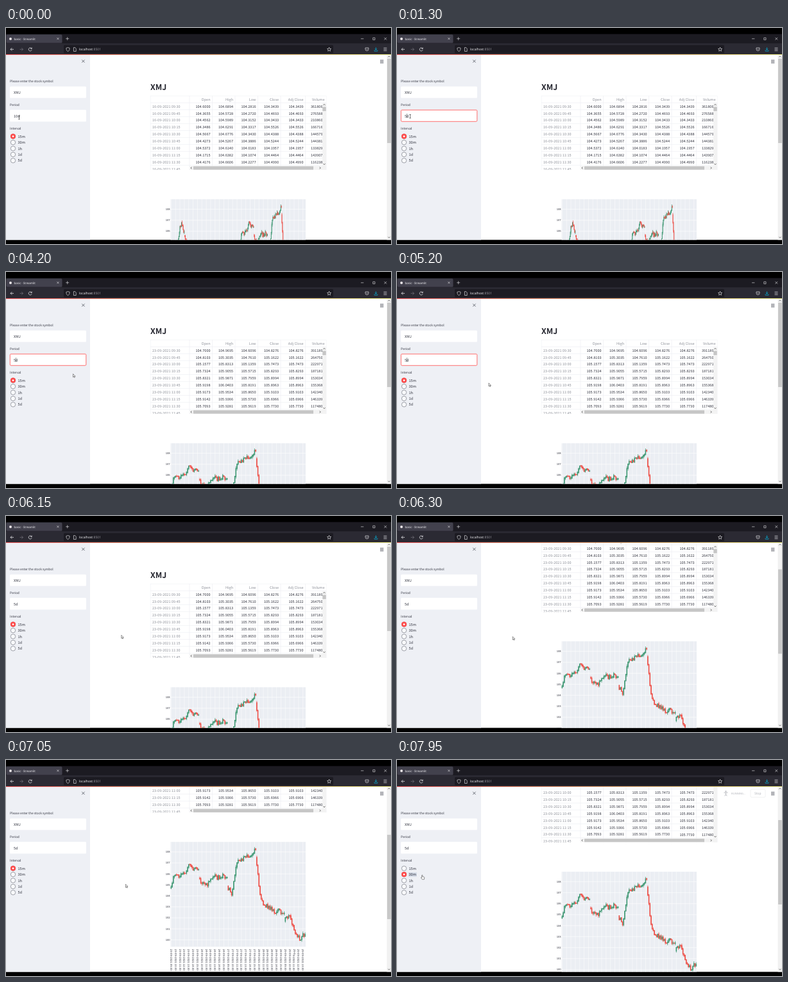
Write an HTML page that moves like this. It is 600 px wide and 338 px high and loops after 8000 ms.

```html
<!DOCTYPE html>
<html lang="en">
<head>
<meta charset="utf-8">
<title>basic · Streamlit</title>
<style>
html, body { margin: 0; width: 100%; height: 100%; overflow: hidden; background: #000; }
svg { display: block; width: 100vw; height: 100vh; }
/* The tiny turn keeps small glyphs from being snapped to whole pixels. */
text {
  font-family: "Noto Sans CJK JP", "Noto Sans CJK SC", "Noto Sans CJK", "Open Sans", sans-serif;
  text-rendering: geometricPrecision; white-space: pre; rotate: .01deg;
}
.ui { font-family: "Open Sans", "Noto Sans", sans-serif; }
</style>
</head>
<body>
<svg id="stage" viewBox="0 0 600 338"></svg>
<script>
const LOOP = 8000, SYMBOL = "XMJ", INK = "#31333f", RED = "#ff4b4b";
const stage = document.getElementById("stage");

function el(parent, name, attrs = {}, content) {
  const node = document.createElementNS("http://www.w3.org/2000/svg", name);
  for (const key in attrs) node.setAttribute(key, attrs[key]);
  if (content !== undefined) node.textContent = content;
  parent.appendChild(node);
  return node;
}
const group = (parent, attrs) => el(parent, "g", attrs);
const rect = (parent, x, y, width, height, fill, more) =>
  el(parent, "rect", { x, y, width, height, fill, ...more });
const circle = (parent, cx, cy, r, fill, more) => el(parent, "circle", { cx, cy, r, fill, ...more });
const line = (parent, d, stroke, width, more) =>
  el(parent, "path", { d, stroke, "stroke-width": width, fill: "none", ...more });
const shape = (parent, d, fill, more) => el(parent, "path", { d, fill, ...more });
const text = (parent, x, y, str, size, fill = INK, more) =>
  el(parent, "text", { x, y, "font-size": size, fill, ...more }, str);
const END = { "text-anchor": "end" };
function clip(id, x, y, width, height) {
  rect(el(stage, "clipPath", { id }), x, y, width, height);
  return { "clip-path": `url(#${id})` };
}
const show = (node, on) => node.setAttribute("display", on ? "inline" : "none");
const clamp = v => Math.max(0, Math.min(1, v));
const mix = (a, b, k) => a + (b - a) * k;
const ramp = (t, start, length) => clamp((t - start) / length);
function clock(bar) {
  const minutes = 570 + bar * 15;
  return String(Math.floor(minutes / 60)).padStart(2, "0") + ":" + String(minutes % 60).padStart(2, "0");
}

// Browser window
function drawBrowser() {
  const g = group(stage), pale = "#fbfbfe";
  rect(g, 0, 0, 600, 338, "#000");
  rect(g, 0, 9.5, 600, 15, "#1c1b22");
  rect(g, .5, 10.3, 87, 13.2, "#42414d", { rx: 1.6 });
  circle(g, 7, 17, 2, "#ebe6e8");
  text(g, 12.5, 18.6, "basic · Streamlit", 4.55, pale, { class: "ui" });
  line(g, "M79.4 15.2l3 3m0-3l-3 3M93.2 16.7h5m-2.5-2.5v5", pale, .55);
  line(g, "M553 16.8h4.4M589.4 14.9l3.8 3.8m0-3.8l-3.8 3.8M571.8 15.3h3.2v3.2h-3.2z", pale, .55);
  rect(g, 0, 24, 600, 18, "#2b2a33");
  rect(g, 90, 26.8, 420, 12.8, "#1c1b22", { rx: 1.6 });
  line(g, "M12 33.4H7m2.3-2.3L7 33.4l2.3 2.3", pale, .7);
  line(g, "M21.6 33.4h5m-2.3-2.3l2.3 2.3l-2.3 2.3", "#77767e", .7);
  line(g, "M39.8 32a2.5 2.5 0 1 0 .3 2.3M40.2 30.6v1.9h-1.9", pale, .7);
  line(g, "M96.5 30.5l2.6 .9c0 2.6-.6 4.2-2.6 5.3c-2-1.1-2.6-2.7-2.6-5.3z", pale, .6);
  line(g, "M105.4 30.6h2.3l1.5 1.6v4.3h-3.8z", pale, .6);
  const url = text(g, 114, 35.3, "", 5.05, pale, { class: "ui" });
  el(url, "tspan", {}, "localhost");
  el(url, "tspan", { fill: "#9b9aa2" }, ":8501");
  line(g, "M503.6 30.3l.9 2 2.1.2-1.6 1.5.5 2.2-1.9-1.1-1.9 1.1.5-2.2-1.6-1.5 2.1-.2z", pale, .6);
  line(g, "M560 31h5v2.2a2.5 2.5 0 0 1-5 0zM561.3 32.7l1.2 1.2 1.2-1.2", pale, .6);
  line(g, "M576.5 30.4v3.8m-1.7-1.6l1.7 1.7 1.7-1.7M574 34.8v1.3h5v-1.3", "#00b7e0", .75);
  line(g, "M588.5 31.2h5m-5 2.2h5m-5 2.2h5", pale, .6);
}

// Prices: a few evenly spaced levels shape each trading day, a seeded jitter makes its bars
const EARLIER = [
  [104.6, 104.4, 104.4, 104.5, 106.2, 106.7, 105.9],
  [105.6, 104, 103], [102.5, 102.8], [103, 103.6], [103.6, 104.2]
];
const RECENT = [
  [104.7, 106.1, 105.8, 106, 106.75, 106.5, 106.3],
  [105.6, 105, 105.1, 105.75, 105.65, 105.8, 105.75],
  [104.9, 104.1, 107.2, 107.3, 107.5, 107.75, 108.2],
  [107.5, 103.8, 103.1, 102.9, 102.5, 102.7, 102.3],
  [101.7, 102.4, 100.7, 100.1, 100.6]
];
const DAY_BARS = 26, LAST_BARS = 19;

let seed = 11;
const random = () => (seed = seed * 16807 % 2147483647) / 2147483647;

function makeDay(levels, bars) {
  let open = levels[0];
  return Array.from({ length: bars }, (_, k) => {
    const place = (k + 1) / bars * (levels.length - 1);
    const i = Math.min(Math.floor(place), levels.length - 2);
    const close = mix(levels[i], levels[i + 1], place - i) + (random() - .5) * .42;
    const bar = {
      open, close,
      high: Math.max(open, close) + random() * .2,
      low: Math.min(open, close) - random() * .2,
      volume: Math.round(1e6 + 2.6e6 * Math.exp(-k / 2) + random() * 4e5)
    };
    open = close + (random() - .5) * .06;
    return bar;
  });
}
const allDays = [...EARLIER, ...RECENT].map((levels, d, list) =>
  makeDay(levels, d < list.length - 1 ? DAY_BARS : LAST_BARS));
const PERIODS = [
  { firstDay: 16, days: allDays },
  { firstDay: 23, days: allDays.slice(EARLIER.length) }
];

// Candlestick chart with its range slider
const WIDTH = 210.5, HEIGHT = 164;
const priceY = price => 15.6 + (108 - price) * 17.2;

function drawCandles(parent, days, scale) {
  const bars = days.flat(), step = WIDTH / bars.length;
  const width = step * .85, bodies = ["", ""], wicks = ["", ""];
  const stroke = (x, a, b) =>
    `M${x.toFixed(2)} ${(priceY(a) * scale).toFixed(2)}V${(priceY(b) * scale + .05).toFixed(2)}`;
  bars.forEach(({ open, high, low, close }, i) => {
    const x = (i + .5) * step, falling = close < open ? 1 : 0;
    bodies[falling] += stroke(x, Math.max(open, close), Math.min(open, close));
    wicks[falling] += stroke(x, high, low);
  });
  ["#35936c", "#ee443b"].forEach((color, i) => {
    line(parent, wicks[i], color, Math.min(.7, width));
    line(parent, bodies[i], color, width, { "stroke-linecap": "square" });
  });
}

function drawChart(page) {
  const g = group(page, { transform: "translate(256.5 268)" });
  const back = "#ebeef3", labels = 31, tick = WIDTH * 4 / (4 * DAY_BARS + LAST_BARS);
  rect(g, 0, 0, WIDTH, HEIGHT, back);
  for (let price = 100; price <= 108; price++) {
    line(g, `M0 ${priceY(price)}H${WIDTH}`, "#fff", .6);
    text(g, -.8, priceY(price) + 1.5, price, 4.2, INK, END);
  }
  for (let i = 0; i < labels; i++) {
    const bar = i * 4, x = (i + .125) * tick, day = Math.floor(bar / DAY_BARS);
    const date = 23 + day + (day > 1 ? 2 : 0);
    line(g, `M${x} 0V${HEIGHT}`, "#fff", .5);
    text(g, 0, 0, `${date}-09-2021 ${clock(bar % DAY_BARS)}`, 4.3, INK,
      { transform: `translate(${x - 1.5} 167.6) rotate(90)` });
  }
  rect(g, 0, 207, WIDTH, 36, back);
  const views = PERIODS.map(({ days }) => {
    const view = group(g);
    drawCandles(view, days, 1);
    drawCandles(group(view, { transform: "translate(0 207)" }), days, 36 / HEIGHT);
    return view;
  });
  for (const x of [-1.2, WIDTH - .9])
    rect(g, x, 216, 2, 17, "#fff", { stroke: "#555", "stroke-width": .4 });
  return views;
}

// Quote table
function drawTable(page) {
  const g = group(page, clip("table", 224.5, 105.5, 275, 116.5));
  const grey = "#8d9099", size = 5.57, pitch = 10.88, rows = 10;
  const edges = [286, 321.5, 357, 392.5, 428, 466.5, 499.5];
  const cell = (parent, c, y, str, fill) => text(parent, edges[c + 1] - 2.9, y, str, size, fill, END);
  let grid = "M225 106H499M225 106V222";
  for (const x of edges) grid += `M${x} 106V222`;
  for (let r = 0; r < rows; r++) grid += `M225 ${117 + r * pitch}H499`;
  line(g, grid, "#e4e6ec", .45);
  ["Open", "High", "Low", "Close", "Adj Close", "Volume"].forEach((name, c) =>
    cell(g, c, 113.6, name, grey));
  const views = PERIODS.map(({ firstDay, days }) => {
    const view = group(g);
    for (let r = 0; r < rows; r++) {
      const { open, high, low, close, volume } = days[0][r], y = 124.6 + r * pitch;
      text(view, 228, y, `${firstDay}-09-2021 ${clock(r)}`, size, grey);
      if (r === rows - 1) continue;
      [open, high, low, close, close].forEach((price, c) => cell(view, c, y, price.toFixed(4)));
      cell(view, 5, y, volume);
    }
    return view;
  });
  rect(g, 493, 117.3, 6, 105, "#f3f3f3");
  rect(g, 286.2, 216, 213, 6, "#f3f3f3");
  rect(g, 493.3, 123.5, 5.4, 6.5, "#c6c6c6");
  rect(g, 292, 216.4, 187, 5.3, "#c6c6c6");
  line(g, "M494.5 120.8l1.5-1.5 1.5 1.5M494.5 212.3l1.5 1.5 1.5-1.5M289.4 217.5l-1.5 1.5 1.5 1.5M488.8 217.5l1.5 1.5-1.5 1.5", "#444", .8);
  return views;
}

function drawSidebar() {
  const g = group(stage);
  rect(g, 0, 42, 131, 289.5, "#eef0f5");
  line(g, "M118.2 49.7l4.4 4.4m0-4.4l-4.4 4.4", "#5d606a", .9);
  text(g, 6, 85.4, "Please enter the stock symbol", 4.9);
  rect(g, 6, 91.5, 119, 18, "#fff", { rx: 1.5 });
  text(g, 12, 102.5, SYMBOL, 5.58);
  text(g, 6, 122.3, "Period", 4.9);
  rect(g, 6, 128, 119, 18.5, "#fff", { rx: 1.5 });
  const focus = rect(g, 6.3, 128.3, 118.5, 18, "none", { rx: 1.5, stroke: RED, "stroke-width": .8 });
  const period = text(g, 12, 139.9, "", 5.58);
  const caret = rect(g, 0, 134, .5, 7, "#222");
  text(g, 6, 158.8, "Interval", 4.9);
  const hover = rect(g, 17.8, 175.8, 13, 6.8, "#d3dae6");
  const dots = ["15m", "30m", "1h", "1d", "5d"].map((name, i) => {
    const cy = 169.6 + i * 9.45;
    circle(g, 11, cy, 3.7, "#f8f9fb", { stroke: "#666873", "stroke-width": .6 });
    text(g, 18.5, cy + 2, name, 5.58);
    const dot = group(g);
    circle(dot, 11, cy, 4, RED);
    circle(dot, 11, cy, 1.4, "#fff");
    return dot;
  });
  return { focus, period, caret, hover, dots };
}

function drawStatus() {
  const g = group(stage), grey = "#a5a7af";
  circle(g, 512.5, 49.1, 1, grey);
  line(g, "M509.5 51h6M512.5 51v2.5l-1.6 2.8M512.5 53.5l1.6 2.8", grey, .9);
  text(g, 521, 54, "RUNNING...", 4.2, grey);
  rect(g, 551, 46, 23, 12.3, "#fff", { rx: 1.5, stroke: "#d5d6da", "stroke-width": .4 });
  text(g, 557, 54.2, "Stop", 4.9, grey);
  return g;
}

function drawPointers() {
  const beam = group(stage), arrow = group(stage), hand = group(stage);
  line(beam, "M-1.3-2.8h2.6M0-2.8v5.6M-1.3 2.8h2.6", "#222", .6);
  const outline = { stroke: "#222", "stroke-width": .5, "stroke-linejoin": "round" };
  shape(arrow, "M0 0v5l1.2-1.1.8 1.8.8-.4-.8-1.7h1.6z", "#fff", outline);
  shape(hand, "M-.6 0q.6-.6 1.2 0v2.3l2.4.6q.6.2.5.9l-.5 2.7h-3l-2-2.6q.3-.8 1.4-.1z", "#fff", outline);
  return { beam, arrow, hand };
}

drawBrowser();
rect(stage, 0, 42, 600, 289.5, "#fff");
const page = group(group(stage, clip("view", 131, 42, 462.5, 289.5)));
text(page, 225, 97.3, SYMBOL, 12.3, "#262730", { "font-weight": 700 });
const tables = drawTable(page), charts = drawChart(page);
const sidebar = drawSidebar();
const status = drawStatus();
line(stage, "M583 50.4h5.4m-5.4 2.1h5.4m-5.4 2.1h5.4", INK, .75);
rect(stage, 593.5, 42, 6.5, 289.5, "#f1f1f1");
const thumb = rect(stage, 594, 48, 5.7, 132, "#c8c8c8");
line(stage, "M595.3 45.6l1.6-1.6 1.6 1.6M595.3 326.8l1.6 1.6 1.6-1.6", "#555", .8);
const accent = el(stage, "linearGradient", { id: "accent" });
el(accent, "stop", { offset: 0, "stop-color": RED });
el(accent, "stop", { offset: 1, "stop-color": "#fffd80" });
rect(stage, 0, 41.2, 600, .9, "url(#accent)");
const pointers = drawPointers();

// Timeline
const NOTCH = 46.6, BLUR = 5400, RERUN = 1600, LOADED = 2000, PICK = 7850;
const STOPS = [
  [0, 20.5, 140], [150, 20.5, 138.2], [2400, 20.5, 138.2], [3800, 101, 155], [4050, 103, 158],
  [4350, 106, 161], [4500, 106, 161], [5900, 179.8, 186.5], [6200, 179.8, 186.5],
  [6500, 181.2, 193], [7050, 186.7, 194.5], [7600, 39.3, 180.3], [LOOP, 39.3, 180.3]
];

function scrollAt(t) {
  const notch = start => 1 - (1 - ramp(t, start, 160)) ** 2;
  let turns = -notch(6840) - notch(7080);
  for (let i = 0; i < 4; i++) turns += notch(6180 + i * 62);
  return turns * NOTCH;
}
function pointerAt(t) {
  const i = STOPS.findIndex(stop => stop[0] > t), [t0, x0, y0] = STOPS[i - 1], [t1, x1, y1] = STOPS[i];
  const k = ramp(t, t0, t1 - t0);
  return [mix(x0, x1, k), mix(y0, y1, k)];
}
function caretOn(t) {
  if (t < 300 || t >= BLUR) return false;
  if (t < 1050) return t < 550 || t >= 800;
  return t < 1550 || Math.floor((t - 4050) / 250) % 2 === 0;
}

function render(t) {
  const scroll = scrollAt(t);
  page.setAttribute("transform", `translate(0 ${-scroll})`);
  thumb.setAttribute("y", 48 + scroll * .494);

  const period = t >= LOADED ? 1 : 0;
  [tables, charts].forEach(views => views.forEach((view, i) => show(view, i === period)));

  const count = t < 1050 ? "10" : t < 1150 ? "1" : t < 1300 ? "" : "5";
  sidebar.period.textContent = count + "d";
  sidebar.caret.setAttribute("x", 12 + count.length * 3.1);
  show(sidebar.caret, caretOn(t));
  sidebar.focus.setAttribute("opacity", ramp(t, 275, 100) - ramp(t, BLUR, 100));

  const picked = t >= PICK ? 1 : 0;
  sidebar.dots.forEach((dot, i) => show(dot, i === picked));
  show(sidebar.hover, picked);
  status.setAttribute("opacity", ramp(t, RERUN, 150) - ramp(t, 2100, 100) + ramp(t, PICK - 30, 150));

  const [x, y] = pointerAt(t);
  const kind = x < 125 && y > 128 && y < 146.5 ? "beam" : x < 45 && y > 165 ? "hand" : "arrow";
  for (const name in pointers) {
    show(pointers[name], name === kind);
    pointers[name].setAttribute("transform", `translate(${x} ${y})`);
  }
}

const began = performance.now();
function tick() {
  render((performance.now() - began) % LOOP);
  requestAnimationFrame(tick);
}
tick();
</script>
</body>
</html>
```
